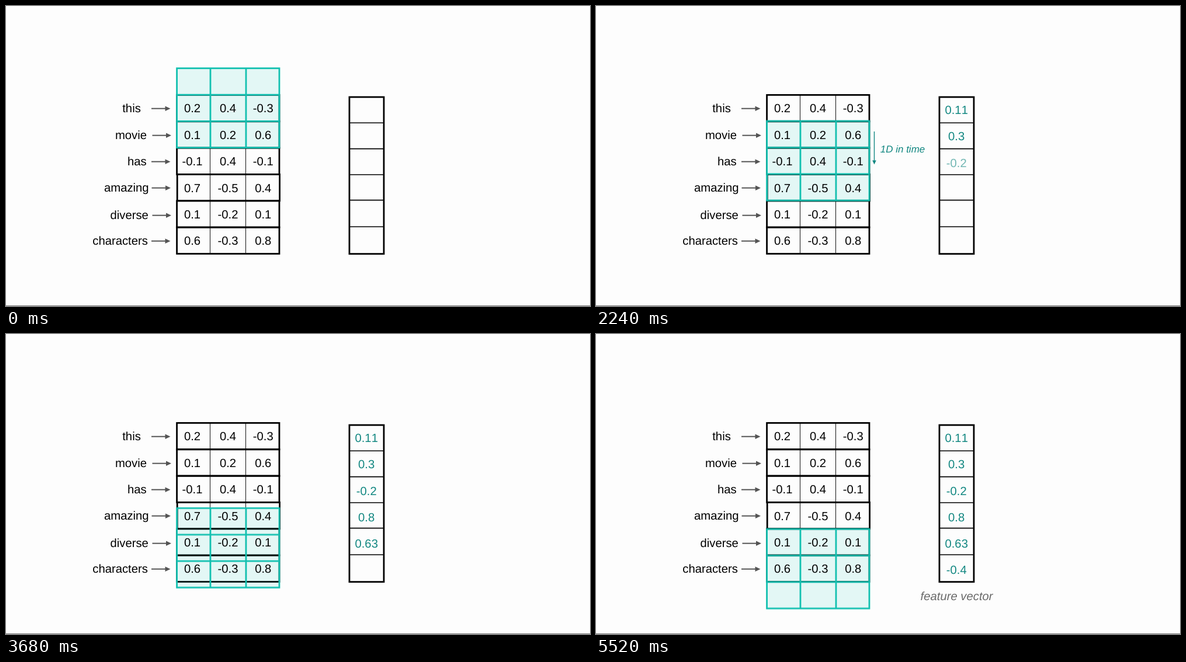
Recreate the animation shown at these times as an HTML page. Size 1000x514 px, loop 5.6 s.

```html
<!DOCTYPE html>
<html lang="en">
<head>
<meta charset="utf-8">
<title>1D convolution over word vectors</title>
<style>
html, body { margin: 0; width: 100%; height: 100%; overflow: hidden; background: #fdfdfd; }
svg { display: block; width: 100vw; height: 100vh; }
text {
  font: 20.3px "Liberation Sans", Arial, sans-serif;
  font-kerning: none;
  text-anchor: middle;
  text-rendering: geometricPrecision;
}
.box { fill: none; stroke: #000; stroke-width: 2.8; }
.thin { fill: none; stroke: #222; stroke-width: 1.1; }
.rule { fill: none; stroke: #000; stroke-width: 1.6; }
.arrow { fill: none; stroke: #555; stroke-width: 2; }
.head { fill: #555; }
.out { fill: #128781; }
.caption { font-style: italic; fill: #6a6a6a; }
.hint text { font-size: 17px; font-style: italic; fill: #128781; }
.shaft { stroke: #128781; stroke-width: 1.4; }
.tint { fill: #12c0b0; fill-opacity: .105; }
.frame { fill: none; stroke: #12c0b0; stroke-width: 2.8; }

.window, .out, .caption, .hint, .pointer { animation: 5.6s linear infinite both; }
.window { animation-name: slide; animation-timing-function: cubic-bezier(.455, .03, .515, .955); }
.pointer { animation-name: follow; animation-timing-function: cubic-bezier(.455, .03, .515, .955); }
.hint { animation-name: hint; }
.caption { animation-name: caption; }
.v0 { animation-name: v0; }
.v1 { animation-name: v1; }
.v2 { animation-name: v2; }
.v3 { animation-name: v3; }
.v4 { animation-name: v4; }
.v5 { animation-name: v5; }

@keyframes slide {
  0%, 20.91% { transform: translateY(0); }
  25.91%, 31.88% { transform: translateY(45.4px); }
  36.88%, 42.82% { transform: translateY(90.4px); }
  47.82%, 53.77% { transform: translateY(136.4px); }
  58.77%, 64.14% { transform: translateY(182px); }
  69.14%, 100% { transform: translateY(227.5px); }
}
@keyframes follow {
  0%, 42.82% { transform: translateY(0); }
  47.82%, 100% { transform: translateY(48.5px); }
}
@keyframes hint {
  0%, 30.4% { opacity: 0; }
  34%, 52.5% { opacity: 1; }
  56.4%, 100% { opacity: 0; }
}
@keyframes v0 { 0%, 14.3% { opacity: 0; } 18.2%, 100% { opacity: 1; } }
@keyframes v1 { 0%, 26.8% { opacity: 0; } 30.7%, 100% { opacity: 1; } }
@keyframes v2 { 0%, 37.7% { opacity: 0; } 41.6%, 100% { opacity: 1; } }
@keyframes v3 { 0%, 48.6% { opacity: 0; } 52.5%, 100% { opacity: 1; } }
@keyframes v4 { 0%, 59.5% { opacity: 0; } 63.4%, 100% { opacity: 1; } }
@keyframes v5 { 0%, 69.6% { opacity: 0; } 73.5%, 100% { opacity: 1; } }
@keyframes caption { 0%, 72.5% { opacity: 0; } 76.3%, 100% { opacity: 1; } }
</style>
</head>
<body>
<svg id="stage" viewBox="0 0 1000 514" preserveAspectRatio="none"></svg>
<script>
// word, centre x, label baseline, arrow start x, vector
const rows = [
  ["this", 215, 182, 249, ["0.2", "0.4", "-0.3"]],
  ["movie", 214, 228, 250.5, ["0.1", "0.2", "0.6"]],
  ["has", 224.3, 273, 249, ["-0.1", "0.4", "-0.1"]],
  ["amazing", 206.3, 318, 249.5, ["0.7", "-0.5", "0.4"]],
  ["diverse", 211.2, 365, 250.5, ["0.1", "-0.2", "0.1"]],
  ["characters", 195.6, 409, 249, ["0.6", "-0.3", "0.8"]]
];
const outputs = ["0.11", "0.3", "-0.2", "0.8", "0.63", "-0.4"];
const columns = [319, 380, 440.3];
const left = 292.6, right = 468, rowHeight = 45.35;

const text = (s, x, y, cls = "") => `<text x="${x}" y="${y}" class="${cls}">${s}</text>`;
const path = (d, cls) => `<path d="${d}" class="${cls}"/>`;
const rect = (x, y, w, h, cls) =>
  `<rect x="${x}" y="${y}" width="${w}" height="${h}" class="${cls}"/>`;

function tableRow(i) {
  const y = 152.4 + i * rowHeight;
  const shift = i === 3 ? 0.6 : 0;
  return path(`M349.5 ${y}v${rowHeight}M410.5 ${y}v${rowHeight}`, "thin") +
    rect(left + shift, y, right - left, rowHeight, "box");
}

function rowText([word, x, y, ax, vector], i) {
  const ay = y - 6.3;
  const base = 182.3 + i * 45.4;
  return text(word, x, y) +
    path(`M${ax} ${ay}h25`, "arrow") +
    path(`M${ax + 23.5} ${ay - 4.3}l9 4.3l-9 4.3z`, "head") +
    vector.map((v, c) => text(v, columns[c], base)).join("");
}

function windowBox() {
  const top = 106.7, h = rowHeight * 3;
  const lines = `M${left} ${top + rowHeight}H${right}M${left} ${top + 2 * rowHeight}H${right}` +
    `M350 ${top}v${h}M411 ${top}v${h}`;
  return `<g class="window">${rect(left, top, right - left, h, "tint")}${path(lines, "frame")}` +
    `${rect(left, top, right - left, h, "frame")}</g>`;
}

const featureBox = path([200.2, 244.6, 289, 332.6, 378.2].map(y => `M588 ${y}H647`).join(""), "rule") +
  rect(588, 156, 59, 268.7, "box");

const hint = `<g class="hint">${text("1D in time", 525, 251.3)}
  <g class="pointer">${path("M476.5 215v51", "shaft")}${path("M473.2 264.5h6.6l-3.3 7z", "out-head")}</g></g>`
  .replace('class="out-head"', 'fill="#128781"');

document.getElementById("stage").innerHTML =
  rect(0, 513, 1000, 1, "floor").replace('class="floor"', 'fill="#777"') +
  rows.map((_, i) => tableRow(i)).join("") +
  windowBox() +
  rows.map(rowText).join("") +
  featureBox +
  outputs.map((v, i) => text(v, 617.2, 185.2 + i * 45.15, `out v${i}`)).join("") +
  text("feature vector", 617.6, 455.7, "caption") +
  hint;
</script>
</body>
</html>
```
